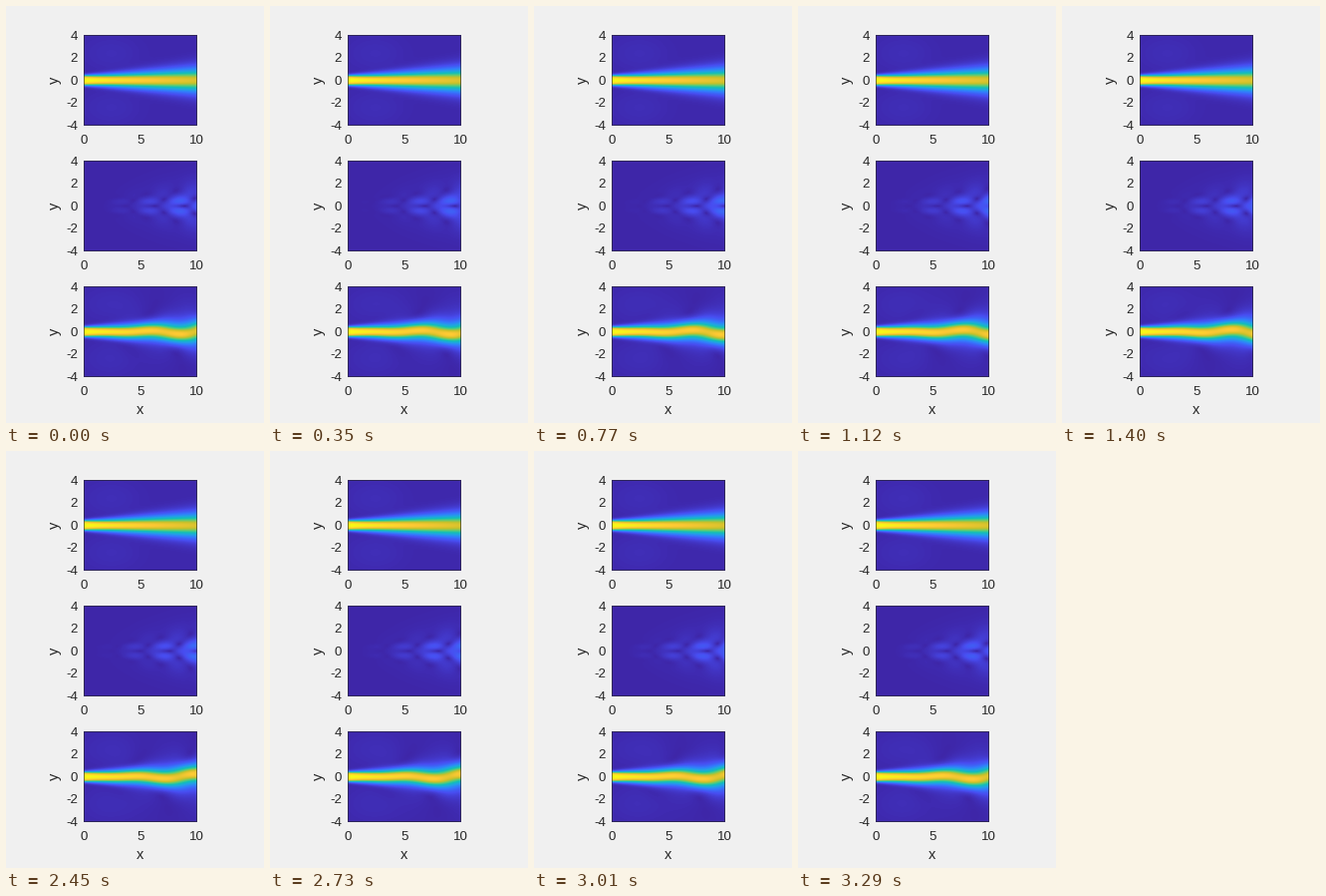
A matplotlib script that plays this animation: 259x418 px, repeating every 3.36 s.

```python
import numpy as np
import matplotlib.pyplot as plt
from matplotlib.animation import FuncAnimation
from matplotlib.colors import LinearSegmentedColormap
from matplotlib.patches import Rectangle

W, H, DPI = 259, 418, 64
FRAMES, STEP = 48, 70
LEFT, TOPS, PW, PH = 78, (29, 155, 281), 114, 91
PX = 72 / DPI
INK = "#262626"

plt.rcParams["font.family"] = "Liberation Sans"

SPEED = LinearSegmentedColormap.from_list("speed", [
    "#3e26a8", "#484df0", "#347afd", "#21a3e4", "#12beb9",
    "#5ccc75", "#c9c12a", "#fec834", "#f9fb15"])

# Flow coordinates, one point per pixel
x, y = np.meshgrid(np.linspace(0, 10, PW), np.linspace(4, -4, PH))

# Spreading mean jet with weak entrainment towards it
HALF = 0.41
theta = 0.15 + 0.072 * x
core = 1 - 0.021 * x


def mean_jet(y):
    shape = np.tanh((y + HALF) / theta) - np.tanh((y - HALF) / theta)
    return core * shape / (2 * np.tanh(HALF / theta))


U = mean_jet(y)
U_y = (mean_jet(y + 0.01) - mean_jet(y - 0.01)) / 0.02
V = -np.tanh(2 * y) * (0.008 + 0.02 * np.exp(
    -((x - 2.4) / 2.6) ** 2 - ((np.abs(y) - 2.4) / 1.6) ** 2))

# Sinuous wave: grows as a power of x, travels downstream,
# and decays outside the jet with its crests leaning upstream
K, OMEGA, CREST = 2 * np.pi / 5.5, 0.56, 5.7
AMP, POWER, LEAN = 0.4, 2.5, 0.4
growth = POWER / np.maximum(x, 0.1)
decay = np.exp((1j * LEAN - K) * np.maximum(np.abs(y) - 0.7, 0))
outside = np.tanh(3 * y) * (1 - U / core)


def wave(i):
    phase = K * (x - CREST) - 2 * np.pi * i / (FRAMES - 1)
    eta = AMP * (x / 10) ** POWER * np.exp(1j * phase)
    u = -eta * U_y - OMEGA * eta * outside * decay
    v = (U * (1j * K + growth) - 1j * OMEGA) * eta * decay
    return u.real, v.real


def fields(i):
    u, v = wave(i)
    return np.hypot(u, v), np.hypot(U + u, V + v)


fig = plt.figure(figsize=(W / DPI, H / DPI), dpi=DPI, facecolor="#f0f0f0")
ax = fig.add_axes([0, 0, 1, 1])
ax.axis("off")


def label(px, py, text, size=13.3, **kw):
    ax.text(px, py, text, fontsize=size * PX, color=INK, **kw)


def panel(top, data):
    img = ax.imshow(data, cmap=SPEED, vmin=0, vmax=1, aspect="auto",
                    interpolation="nearest",
                    extent=(LEFT, LEFT + PW, top + PH, top))
    ax.add_patch(Rectangle((LEFT + .5, top + .5), PW - 1, PH - 1, fill=False,
                           ec=INK, lw=PX, alpha=0.6, snap=False, zorder=3))
    for n in range(5):
        label(72, top + 4.8 + 22.5 * n, str(4 - 2 * n), ha="right")
    for n in range(3):
        label(LEFT + 56.9 * n, top + 109.3, str(5 * n), ha="center")
    label(49, top + 45.5, "y", 14.6, ha="center", va="center", rotation=90)
    return img


first_wave, first_total = fields(0)
panel(TOPS[0], np.hypot(U, V))
wave_img = panel(TOPS[1], first_wave)
total_img = panel(TOPS[2], first_total)
label(135, 409, "x", 14.6, ha="center")
ax.set_xlim(0, W)
ax.set_ylim(H, 0)


def update(i):
    ripple, total = fields(i)
    wave_img.set_data(ripple)
    total_img.set_data(total)
    return wave_img, total_img


anim = FuncAnimation(fig, update, frames=FRAMES, interval=STEP,
                     repeat=True, repeat_delay=0, blit=False)
plt.show()
```
